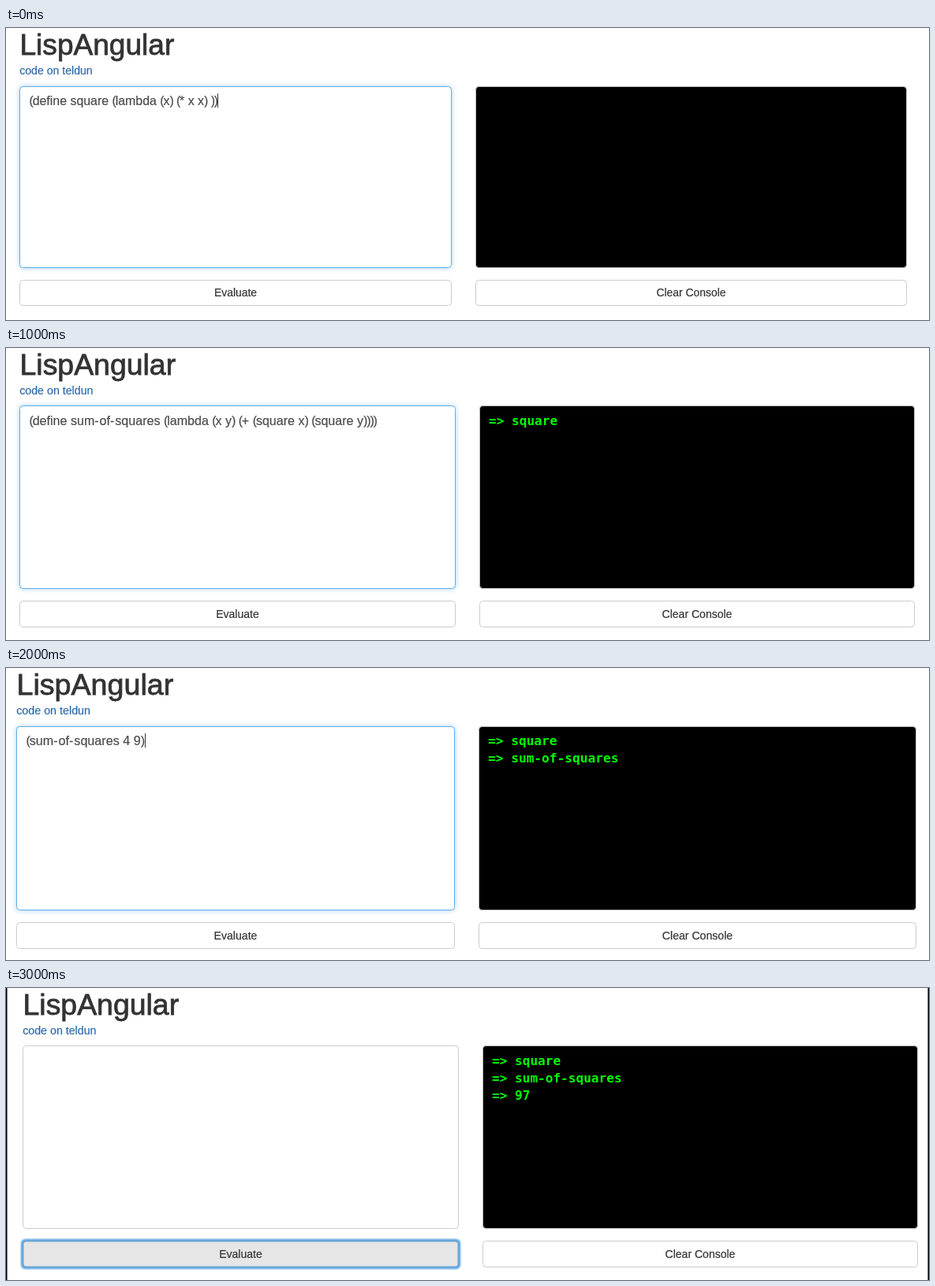
Recreate the animation shown at these times as an HTML page. Size 1170 by 371 pixels, loop 4000 ms.

```html
<!DOCTYPE html>
<html lang="en">
<head>
<meta charset="utf-8">
<title>LispAngular</title>
<style>
  html, body { margin: 0; width: 100%; height: 100%; overflow: hidden; background: #fff; }
  svg { display: block; width: 1170px; height: 371px; }
  text { font-family: "Liberation Sans", Arial, sans-serif; white-space: pre; stroke-width: .2; }
  .title { fill: #333; stroke: #333; stroke-width: .8; }
  .link { fill: #2c69ab; stroke: #2c69ab; }
  .code { fill: #4c4c4c; stroke: #4c4c4c; }
  .paren { letter-spacing: -.074em; }
  .hyphen { letter-spacing: .056em; }
  .label { fill: #333; stroke: #333; text-anchor: middle; }
  .out { font-family: "DejaVu Sans Mono", monospace; font-weight: bold; fill: #0f0; stroke: none; }
</style>
</head>
<body>
<svg viewBox="0 0 1170 371">
  <defs>
    <filter id="soft" filterUnits="userSpaceOnUse" x="0" y="0" width="1170" height="371">
      <feGaussianBlur stdDeviation="3.6"/>
    </filter>
    <filter id="ring" filterUnits="userSpaceOnUse" x="0" y="0" width="1170" height="371">
      <feGaussianBlur stdDeviation="0.9"/>
    </filter>
  </defs>
  <g id="stage"></g>
</svg>
<script>
const STEP = 1000, BASE_WIDTH = 547, GUTTER = 31;
const RESULTS = ["square", "sum-of-squares", "97"];

// x, w: left column; top, bottom: panels; btn, btnEnd: buttons; base: heading baseline
const scenes = [
  { x: 17.5, w: 547, top: 74.5, bottom: 304.5, btn: 320.5, btnEnd: 352.5, base: 34,
    code: "(define square (lambda (x) (* x x) ))", caret: 268.5 },
  { x: 17.5, w: 552, top: 73.5, bottom: 305.5, btn: 321.5, btnEnd: 354.5, base: 33.5,
    code: "(define sum-of-squares (lambda (x y) (+ (square x) (square y))))" },
  { x: 13.5, w: 555, top: 74.5, bottom: 307.5, btn: 323.5, btnEnd: 356.5, base: 34,
    code: "(sum-of-squares 4 9)", caret: 176.5 },
  { x: 21.5, w: 552, top: 73.5, bottom: 305.5, btn: 321.5, btnEnd: 354.5, base: 33.5,
    code: "", pressed: true, framed: true }
];

const rect = (x, y, w, h, attrs) =>
  `<rect x="${x}" y="${y}" width="${w}" height="${h}" ${attrs}/>`;

const text = (cls, x, y, size, content) =>
  `<text class="${cls}" x="${x}" y="${y}" font-size="${size.toFixed(2)}">${content}</text>`;

const spaced = code => code
  .replace(/[()]+|-/g, m => `<tspan class="${m === "-" ? "hyphen" : "paren"}">${m}</tspan>`);

function button(x, y, w, h, label, size, pressed) {
  const ring = pressed
    ? rect(x, y, w, h, 'rx="3" fill="none" stroke="#4f9fe0" stroke-width="5" filter="url(#ring)"')
    : "";
  const look = pressed ? 'fill="#e6e6e6" stroke="#6ba6d6" stroke-width="2"' : 'fill="#fff" stroke="#ccc"';
  return ring + rect(x, y, w, h, `rx="4" ${look}`) +
    text("label", x + w / 2, y + h / 2 + 4.9, size, label);
}

function draw(s, index) {
  const k = s.w / BASE_WIDTH;
  const x2 = s.x + s.w + GUTTER, w2 = s.w - 1;
  const h = s.bottom - s.top, btnH = s.btnEnd - s.btn;
  const textY = s.base + 64.2;
  const parts = [];

  if (!s.pressed) {
    parts.push(rect(s.x, s.top, s.w, h, 'rx="4" fill="#66afe9" opacity=".65" filter="url(#soft)"'));
  }
  parts.push(
    text("title", s.x, s.base, 37.1 * k, "LispAngular"),
    text("link", s.x - .3, s.base + 25.3, 14.1 * k, "code on teldun"),
    rect(s.x, s.top, s.w, h, `rx="4" fill="#fff" stroke="${s.pressed ? "#ccc" : "#5fade9"}"`),
    text("code", s.x + 12, textY, 15.93 * k, spaced(s.code)),
    rect(x2, s.top, w2, h, 'rx="4" fill="#000" stroke="#bbb"')
  );
  if (s.caret) parts.push(rect(s.caret - .5, textY - 15, 1, 18, 'fill="#333"'));
  RESULTS.slice(0, index).forEach((line, i) =>
    parts.push(text("out", x2 + 11.5, textY - .2 + i * 22, 15.93 * k, "=&gt; " + line)));
  parts.push(
    button(s.x, s.btn, s.w, btnH, "Evaluate", 13.9 * k, s.pressed),
    button(x2, s.btn, w2, btnH, "Clear Console", 13.9 * k)
  );
  if (s.framed) {
    parts.push(rect(0, 0, 1.5, 371, 'fill="#000"'), rect(1168.5, 0, 1.5, 371, 'fill="#000"'));
  }
  return parts.join("");
}

const stage = document.getElementById("stage");
let shown = -1;

function show(index) {
  if (index === shown) return;
  shown = index;
  stage.innerHTML = draw(scenes[index], index);
}

const start = performance.now();
function tick() {
  show(Math.floor((performance.now() - start) / STEP) % scenes.length);
  requestAnimationFrame(tick);
}
tick();
</script>
</body>
</html>
```
